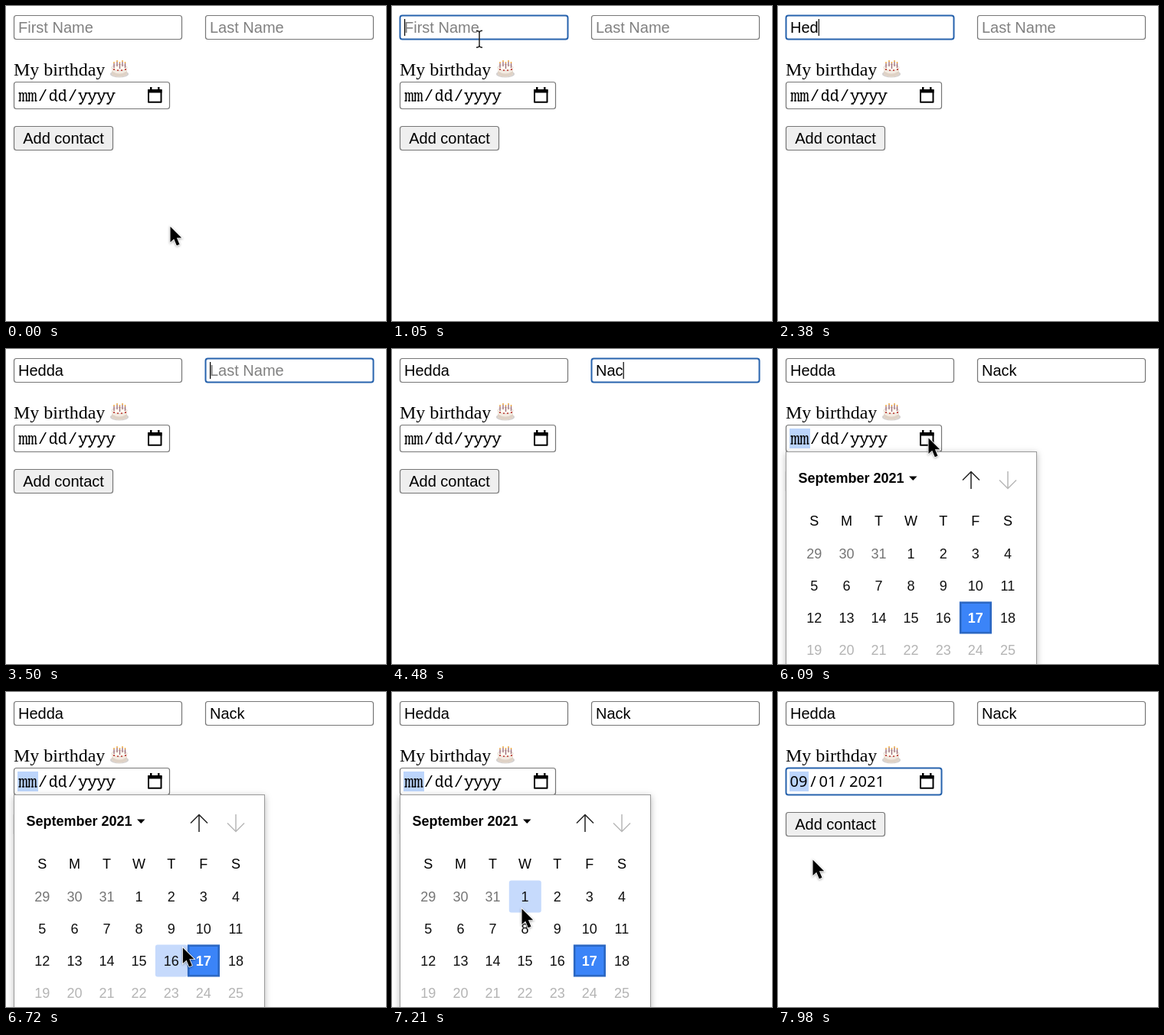
These frames come from a looping animation (496x412 px, 8000 ms). An HTML page:

```html
<!DOCTYPE html>
<html lang="en">
<head>
<meta charset="utf-8">
<title>Contact form</title>
<style>
html, body { margin: 0; width: 100%; height: 100%; overflow: hidden; background: #fff; }
svg { display: block; font: 20px "Liberation Sans", Arial, sans-serif; }
text { white-space: pre; }
.box { fill: #fff; stroke: #767676; stroke-width: 1.2; }
.box.focus { stroke: #2763ad; stroke-width: 2; }
.label { font: 24px "Liberation Serif", Times, serif; }
.mono { font: 20px "Liberation Mono", Courier, monospace; }
.digits { font: 20px "Noto Sans", sans-serif; }
.mid { text-anchor: middle; }
#popup { font-size: 18px; filter: drop-shadow(0 2px 4px rgba(0, 0, 0, .28)); }
#pointer { filter: drop-shadow(0 1.5px 1.5px rgba(0, 0, 0, .35)); }
</style>
</head>
<body>
<svg width="496" height="412" viewBox="0 0 496 412">
  <rect id="firstBox" class="box" x="10.5" y="12.5" width="219" height="31" rx="3"/>
  <rect id="lastBox" class="box" x="260.5" y="12.5" width="219" height="31" rx="3"/>
  <text id="first" x="16" y="35"></text>
  <text id="last" x="266" y="35"></text>
  <rect id="caret" y="17" width="1.2" height="22"/>

  <text class="label" x="10" y="91">My birthday</text>
  <g id="cake">
    <ellipse cx="148" cy="89" rx="12" ry="4.6" fill="#d3d0cf"/>
    <path d="M138 80v8c0 6 20 6 20 0v-8z" fill="#f3ebe2"/>
    <path d="M138 85q10 7 20 0v3c0 6-20 6-20 0z" fill="#dfd2c6"/>
    <ellipse cx="148" cy="80.5" rx="10" ry="4" fill="#fffaf2" stroke="#d8cabd" stroke-width=".7"/>
    <path d="M141 81v-6M145 79v-6M148.500 82v-7M152 79v-6M155.500 81v-6" stroke="#9a6a78" stroke-width="1.3"/>
    <path d="M141 75v-2M145 73v-2M148.500 75v-2M152 73v-2M155.500 75v-2" stroke="#eda83c" stroke-width="1.5"/>
    <path d="M140 83h2m3 1.200h2m3 0h2m3-1.200h2" stroke="#c2504b" stroke-width="1.8"/>
  </g>

  <rect id="dateBox" class="box" x="10.5" y="99.5" width="203" height="35" rx="3"/>
  <rect id="mark" x="15" y="104" height="26" fill="#bcd5fb"/>
  <g id="dateHint"></g>
  <g id="dateValue"></g>
  <path d="M186 110h16.500v15.700h-16.500z" fill="none" stroke="#000" stroke-width="2" stroke-linejoin="round"/>
  <path d="M185 109h18.500v4.500h-18.500zM188 106h2.500v4h-2.500zM198 106h2.500v4h-2.500z"/>

  <rect x="10.500" y="157.500" width="129" height="31" rx="3" fill="#efefef" stroke="#767676" stroke-width="1.2"/>
  <text class="mid" x="75" y="180">Add contact</text>

  <g id="popup">
    <rect x="10.5" y="134.5" width="327" height="300" fill="#fff" stroke="#9a9a9a"/>
    <text x="26.500" y="175" font-weight="bold">September 2021</text>
    <path d="M171 166.500h10.500l-5.250 5.500z"/>
    <g fill="none" stroke-width="1.5">
      <path d="M252 183v-22.500M241 171.500l11-11 11 11" stroke="#222"/>
      <path d="M300 160v22.500M289 171.500l11 11 11-11" stroke="#b8b8b8"/>
    </g>
    <rect id="hover" width="42" height="42" rx="3" fill="#c6dafc"/>
    <rect x="238.2" y="331.700" width="39.500" height="39.500" fill="#3b84f8" stroke="#2b67c2" stroke-width="2.600"/>
    <g id="days" class="mid"></g>
  </g>

  <g id="cursor">
    <path id="pointer" d="M.5.500v20.500l4.700-4.300 3.600 8.600 3.700-1.600-3.600-8.400h6.300z" stroke="#fff" stroke-width="1.6" paint-order="stroke"/>
    <path id="beam" d="M-4-11q4 0 4 3q0-3 4-3M0-8v16M-4 11q4 0 4-3q0 3 4 3" fill="none" stroke="#222" stroke-width="1.5"/>
  </g>
</svg>
<script>
const $ = id => document.getElementById(id);
const show = (id, on) => $(id).style.display = on ? '' : 'none';
const label = (x, y, s, more = '') => `<text x="${x}" y="${y}" ${more}>${s}</text>`;

const LOOP = 8000, STEP = 70, BLINK = 560;
const FOCUS_LAST = 3500, FOCUS_DATE = 6020, OPEN = 6090, PICK = 7560;
const CELL = 42.1, LEFT = 26.2, TOP = 246.500;

// Key presses: time, field, value so far
const keys = [
  [1050, 'first', ''], [1680, 'first', 'H'], [2100, 'first', 'He'], [2380, 'first', 'Hed'],
  [3010, 'first', 'Hedd'], [3150, 'first', 'Hedda'], [FOCUS_LAST, 'last', ''],
  [4200, 'last', 'N'], [4340, 'last', 'Na'], [4480, 'last', 'Nac'], [4550, 'last', 'Nack']
];
const hints = { first: 'First Name', last: 'Last Name' };

// Mouse: time, x, y
const path = [
  [0, 214, 288], [70, 214, 288], [280, 310, 190], [420, 315, 90], [560, 215, 35], [700, 110, 24],
  [980, 110, 24], [1260, 126, 101], [2100, 126, 101], [2170, 150, 100], [2310, 139, 97],
  [2660, 139, 92], [5040, 139, 97], [5320, 129, 84], [5670, 166, 122], [5880, 196, 116],
  [6230, 196, 116], [6440, 215, 200], [6650, 238, 335], [6860, 215, 332], [7070, 200, 300],
  [7140, 200, 300], [7210, 169, 283], [7420, 172, 268], [PICK, 172, 268], [7980, 45, 219], [LOOP, 45, 219]
];
const mouseShown = [[0, 1680], [2170, 2380], [2660, 2730], [5040, LOOP]];

// Slab serifs added to the plain monospaced letters
const slabs = {
  m: 'M0 0h3m1.500 0h3m1.500 0h3M0-10h2',
  d: 'M7-14h2.500M9.500 0h2.300',
  y: 'M-.2-10.100h4m4.400 0h4M.8 4h3.500',
  '/': ''
};
const dateParts = (parts, cls) =>
  parts.map(([x, s]) => label(x, 124, s, `class="mid ${cls}"`)).join('');

const hintParts = [[28.5, 'mm'], [48, '/'], [67.5, 'dd'], [87, '/'], [118.5, 'yyyy']];
$('dateHint').innerHTML = dateParts(hintParts, 'mono') + hintParts.map(([x, s]) =>
  [...s].map((c, i) => `<path d="${slabs[c]}" stroke="#000" stroke-width="1.3"
    transform="translate(${x + (i - s.length / 2) * 12} 124)"/>`).join('')).join('');
$('dateValue').innerHTML =
  dateParts([[27, '09'], [46, '/'], [65, '01'], [84, '/'], [116, '2021']], 'digits');

const column = i => 47.3 + CELL * i;
let cells = [...'SMTWTFS'].map((s, i) => label(column(i), 231, s)).join('');
for (let n = 0; n < 28; n++) {
  const day = n < 3 ? 29 + n : n - 2;
  const look = day === 17 ? 'fill="#fff" font-weight="bold"'
    : `fill="${n < 3 ? '#757575' : n > 20 ? '#b4b4b4' : '#111'}"`;
  cells += label(column(n % 7), 274 + 42 * Math.floor(n / 7), day, look);
}
$('days').innerHTML = cells;

function mouseAt(t) {
  const i = path.findIndex(p => p[0] > t);
  const [t0, x0, y0] = path[i - 1], [t1, x1, y1] = path[i];
  const k = (t - t0) / (t1 - t0);
  return [x0 + (x1 - x0) * k, y0 + (y1 - y0) * k];
}

function drawFields(t) {
  const done = keys.filter(k => k[0] <= t);
  for (const id of ['first', 'last']) {
    const value = done.filter(k => k[1] === id).pop()?.[2] || '';
    $(id).textContent = value || hints[id];
    $(id).setAttribute('fill', value ? '#000' : '#808080');
  }
  const key = done.pop();
  const active = key && t < FOCUS_DATE ? key[1] : '';
  $('firstBox').classList.toggle('focus', active === 'first');
  $('lastBox').classList.toggle('focus', active === 'last');
  const caretOn = active && (t - key[0]) % (2 * BLINK) < BLINK;
  show('caret', caretOn);
  if (caretOn) {
    const width = key[2] ? $(active).getComputedTextLength() : 0;
    $('caret').setAttribute('x', (active === 'first' ? 16 : 266) + width);
  }
}

function drawDate(t, x, y) {
  const picked = t >= PICK, open = t >= OPEN && !picked;
  show('mark', t >= FOCUS_DATE);
  $('mark').setAttribute('width', picked ? 25 : 27);
  show('dateHint', !picked);
  show('dateValue', picked);
  $('dateBox').classList.toggle('focus', picked);
  show('popup', open);
  const col = Math.floor((x - LEFT) / CELL), row = Math.floor((y - TOP) / 42);
  show('hover', open && row >= 0 && row < 3 && col >= 0 && col < 7);
  $('hover').setAttribute('x', LEFT + CELL * col + .3);
  $('hover').setAttribute('y', TOP + 42 * row);
}

function drawMouse(t, x, y) {
  const overText = y > 12 && y < 44 && (x > 10 && x < 230 || x > 260 && x < 480);
  show('cursor', mouseShown.some(([from, to]) => t >= from && t < to));
  show('pointer', !overText);
  show('beam', overText);
  $('cursor').setAttribute('transform', `translate(${x} ${y})`);
}

function frame() {
  const t = Math.floor(performance.now() % LOOP / STEP) * STEP;
  const [x, y] = mouseAt(t);
  drawFields(t);
  drawDate(t, x, y);
  drawMouse(t, x, y);
  requestAnimationFrame(frame);
}
frame();
</script>
</body>
</html>
```
